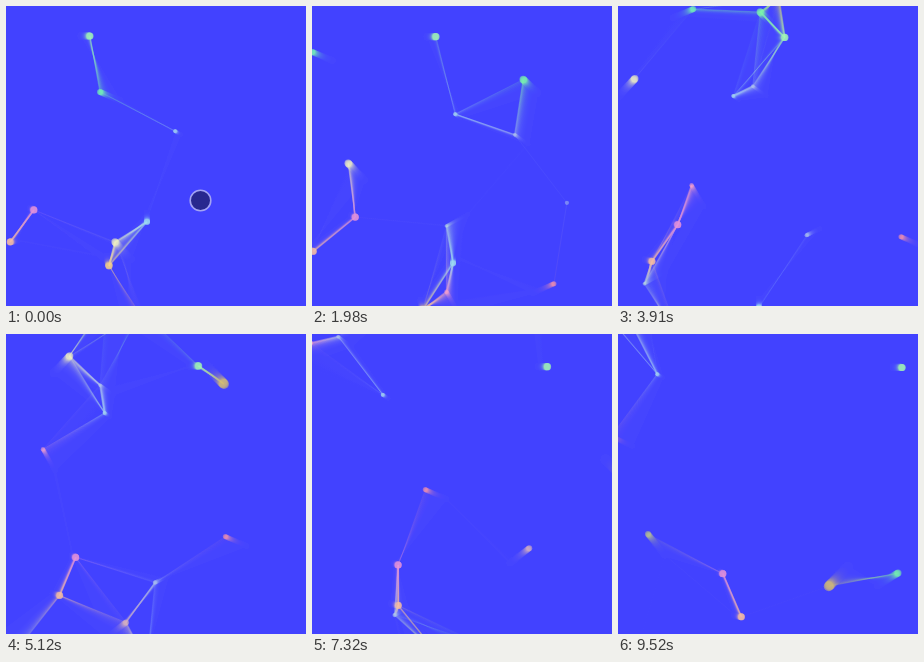
Recreate the animation shown at these times as an HTML page with a canvas. Size 300 by 300 pixels, loop 9.62 s.

```html
<!DOCTYPE html>
<html lang="en">
<head>
<meta charset="utf-8">
<title>Linked particles</title>
<style>
html, body { margin: 0; width: 100%; height: 100%; overflow: hidden; background: #4242ff; }
canvas { display: block; width: 300px; height: 300px; }
</style>
</head>
<body>
<canvas id="stage" width="300" height="300"></canvas>
<script>
const ctx = document.getElementById('stage').getContext('2d');
const LOOP = 9620, LAST = 71;
const BACK = '#4242ff';
const LEFT = -12.5, RIGHT = 315.5;   // side walls the particles bounce off
const REACH = 95;                    // longest link
const SUB = 8, HISTORY = 24;         // trail samples per step, samples kept
const FADE = 0.18;

// Step number and the time it begins, in ms
const beats = [
  [0, 0], [1, 120], [7, 930], [8, 1050], [9, 1170], [16, 2130], [17, 2250],
  [21, 2820], [24, 3210], [25, 3330], [32, 4300], [33, 4450], [38, 5120],
  [40, 5380], [41, 5530], [47, 6340], [48, 6500], [49, 6650], [56, 7630],
  [57, 7780], [61, 8290], [64, 8710], [65, 8830], [70, 9520], [LAST, LOOP]
];

const dot = (x, y, vx, vy, r, rgb, born = -99) => ({ x, y, vx, vy, r, rgb, born });
const dots = [
  dot(84, 30, 2.86, 0.05, 3.6, '165,255,175'),
  dot(94, 86, -6.7, -2.86, 3, '120,255,175'),
  dot(169, 125, -1.857, -1.214, 1.9, '165,215,240'),
  dot(141, 216, 0, 2.96, 3, '160,225,240'),
  dot(109, 236, -5.2, -5.63, 3.7, '250,250,190'),
  dot(103, 260, 0.57, 3.14, 3.6, '255,215,130'),
  dot(28, 204, 1.1, 0.51, 3.5, '235,150,215'),
  dot(4, 236, -2.18, 0.67, 3.4, '255,195,155'),
  dot(143, 321.5, 7.07, -3.13, 2.5, '255,150,165'),
  dot(235.2, 165.9, -7.2, 3.86, 1.8, '185,220,225', 4),
  dot(316.8, 166.6, -4.42, 2.16, 2.1, '175,200,235', 14),
  dot(266.1, 173.8, -4.53, -3.23, 1.8, '180,200,235', 9),
  dot(275.6, 136.5, -4.6, -4.5, 3.7, '125,255,165', 10),
  dot(191.3, 385.1, -4.06, -7.1, 2.2, '255,165,200'),
  dot(-22.2, -190.2, 6.32, 6.32, 5, '222,196,105'),
  dot(-126.2, 476.6, 6.48, -4.95, 3, '225,185,185'),
  dot(-194.6, 526, 6.78, -4.1, 3.5, '120,255,165'),
  dot(426.9, 697, -5.67, -7.1, 3, '195,205,130'),
  dot(328.5, -128.7, -4.5, 1.7, 2, '185,205,230'),
  dot(-253, -435, 3.5, 6, 2, '185,205,230')
];

function stepAt(ms) {
  let i = 1;
  while (ms >= beats[i][1]) i++;
  const [n0, t0] = beats[i - 1], [n1, t1] = beats[i];
  return Math.floor(n0 + (n1 - n0) * (ms - t0) / (t1 - t0) + 0.001);
}

// Reflect a straight path between the side walls
function bounce(x) {
  const w = RIGHT - LEFT;
  const m = (((x - LEFT) % (2 * w)) + 2 * w) % (2 * w);
  return LEFT + (m > w ? 2 * w - m : m);
}

function drawLink(a, b) {
  const d = Math.hypot(a.x - b.x, a.y - b.y);
  if (d >= REACH) return;
  const near = 1 - d / REACH;
  const paint = ctx.createLinearGradient(a.x, a.y, b.x, b.y);
  paint.addColorStop(0, `rgb(${a.rgb})`);
  paint.addColorStop(1, `rgb(${b.rgb})`);
  ctx.globalAlpha = Math.min(0.45, 0.8 * near);
  ctx.lineWidth = 0.6 + 1.6 * near;
  ctx.strokeStyle = paint;
  ctx.beginPath();
  ctx.moveTo(a.x, a.y);
  ctx.lineTo(b.x, b.y);
  ctx.stroke();
}

function disc(x, y, r) {
  ctx.beginPath();
  ctx.arc(x, y, r, 0, 2 * Math.PI);
  ctx.fill();
}

function drawDots(n) {
  const live = dots.filter(p => n >= p.born).map(p => ({
    x: bounce(p.x + p.vx * n), y: p.y + p.vy * n, r: p.r, rgb: p.rgb
  }));
  live.forEach((a, i) => live.slice(i + 1).forEach(b => drawLink(a, b)));
  ctx.globalAlpha = 0.5;
  for (const p of live) {
    ctx.fillStyle = `rgb(${p.rgb})`;
    disc(p.x, p.y, p.r);
  }
}

function drawTouch(n) {
  if (n >= 8) return;
  ctx.globalAlpha = 1;
  ctx.fillStyle = '#28288f';
  ctx.strokeStyle = '#a3a3f3';
  ctx.lineWidth = 1.6;
  disc(194.5 + 6.1 * n, 194.5 - 12.6 * n, 10.3);
  ctx.stroke();
}

function veil(alpha) {
  ctx.globalAlpha = alpha;
  ctx.fillStyle = BACK;
  ctx.fillRect(0, 0, 300, 300);
}

function draw(n) {
  veil(1);
  for (let k = HISTORY; k >= 0; k--) {
    veil(FADE);
    drawDots(n - k / SUB);
  }
  drawTouch(n);
}

const start = performance.now();
let shown = -1;
function tick() {
  const n = stepAt((performance.now() - start) % LOOP);
  if (n !== shown) draw(shown = n);
  requestAnimationFrame(tick);
}
tick();
</script>
</body>
</html>
```
